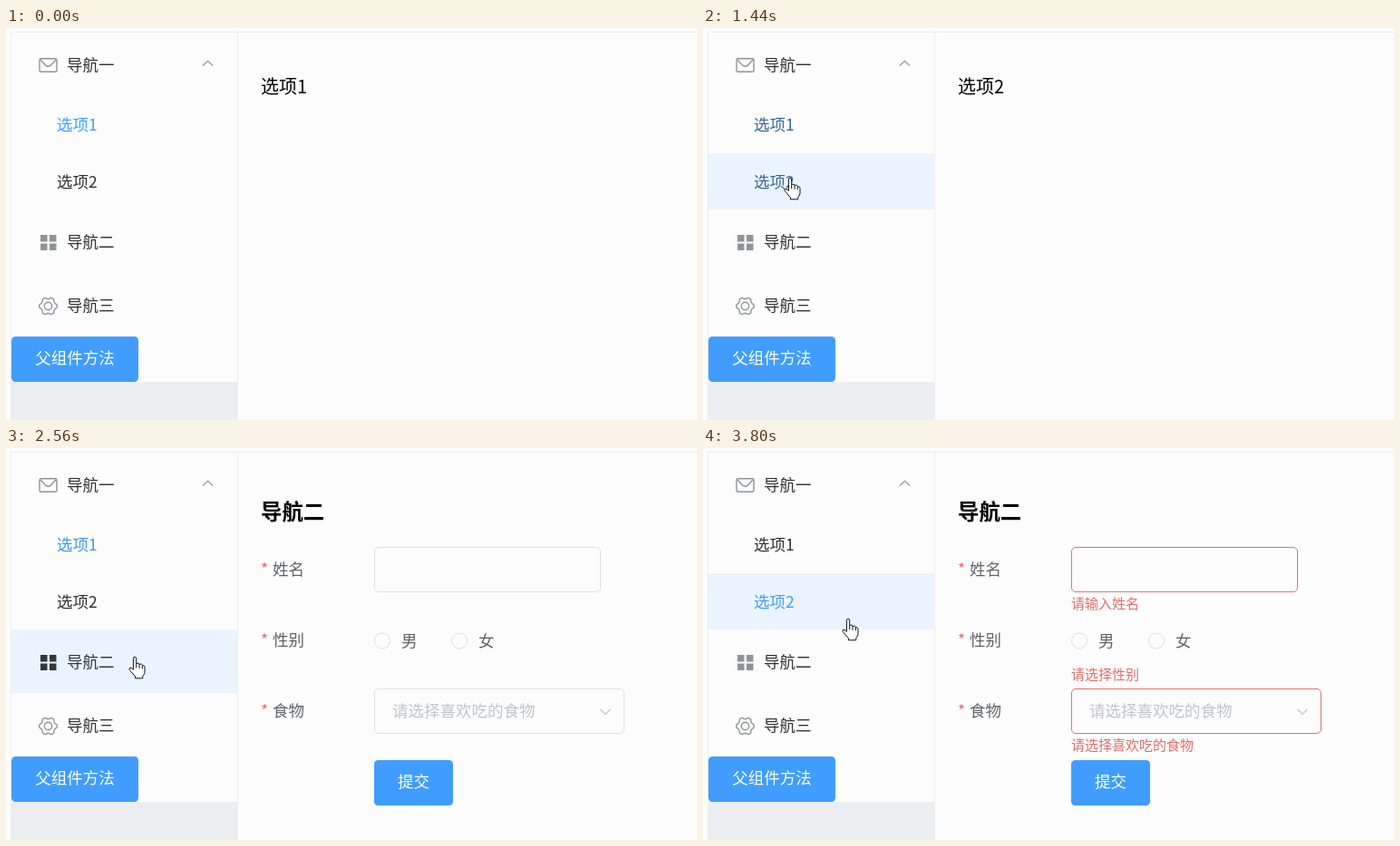
Animation of 762 by 432 pixels, one loop 3840 ms. Source, as an HTML page:

```html
<!DOCTYPE html>
<html lang="zh-CN">
<head>
<meta charset="utf-8">
<style>
html, body { margin: 0; width: 100%; height: 100%; overflow: hidden; background: #fdfdfd; }
svg { display: block; }
text { font: 17.5px "Noto Sans CJK SC", "Noto Sans CJK", sans-serif; fill: #303133; }
.icon { fill: none; stroke: #909399; stroke-width: 1.4; }
.rule { fill: none; stroke: #eeeeee; }
.button { fill: #409dff; }
.light { fill: #fff; }
.field { fill: none; stroke: #dcdfe6; }
.label { fill: #606266; }
.star { fill: #e56a6a; }
.hint { fill: #c0c4cc; }
.error { font-size: 15px; fill: #e56a6a; }
</style>
</head>
<body>
<svg width="762" height="432" viewBox="0 0 762 432">
  <rect x="5" y="390" width="251" height="42" fill="#eaeef1"/>
  <path class="rule" d="M5.5 432V4.5H762"/>
  <path class="rule" stroke="#e6e6e6" d="M255.5 5V390"/>
  <g id="bands"></g>

  <g class="icon">
    <rect x="37" y="33.7" width="19" height="14.6" rx="1.5"/>
    <path d="M38 35l5.5 6q3 2.6 6 0l5.5-6"/>
    <path d="M217 41.5l5.5-5.2 5.5 5.2" stroke-width="1.1"/>
    <path id="gear"/>
    <circle cx="46.5" cy="306.5" r="4.2"/>
  </g>
  <path id="grid" d="M38 228h7.5v7.5h-7.5zM48 228h7.5v7.5h-7.5zM38 237.5h7.5v7.5h-7.5zM48 237.5h7.5v7.5h-7.5z"/>
  <text x="67" y="47">导航一</text>
  <text id="option1" x="56" y="113.3">选项1</text>
  <text id="option2" x="56" y="176.3">选项2</text>
  <text id="nav2" x="67" y="242.3">导航二</text>
  <text x="67" y="312.3">导航三</text>
  <rect class="button" x="6" y="340" width="140" height="50" rx="4.5"/>
  <text class="light" x="32.2" y="370">父组件方法</text>

  <text id="page" x="281" y="71.5" style="font-size:20px;fill:#000"></text>
  <g id="form">
    <text x="281" y="79.3" style="font-size:23.4px;font-weight:700;fill:#000">导航二</text>
    <g id="labels"></g>
    <rect class="field check" x="406.5" y="109.5" width="249" height="49" rx="4.5"/>
    <circle class="field" cx="415" cy="212.5" r="8.5"/>
    <circle class="field" cx="500" cy="212.5" r="8.5"/>
    <text class="label" x="436" y="218.5">男</text>
    <text class="label" x="521" y="218.5">女</text>
    <rect class="field check" x="406.5" y="265.5" width="275" height="49" rx="4.5"/>
    <text class="hint" x="426" y="296.3">请选择喜欢吃的食物</text>
    <path d="M655.5 288l5.5 5.5 5.5-5.5" fill="none" stroke="#c0c4cc" stroke-width="1.2"/>
    <g id="errors"></g>
    <rect class="button" x="406" y="344" width="87" height="50" rx="4.5"/>
    <text class="light" x="432" y="374">提交</text>
  </g>

  <g id="cursor" stroke="#111" fill="#fff" stroke-linejoin="round">
    <path id="arrow" d="M0 0V16.5L3.8 13 6.4 19 9 17.8 6.4 12H11.4Z"/>
    <path id="hand" transform="translate(-1 -.7)" d="M-1.6 14V1.5Q-1.5 0 0 0T1.7 1.5V8Q2.3 6.3 4 7T5 8.5Q6 7.2 7.5 8T8.3 9.5Q11 8.6 11 12V17Q10.5 19.5 8.8 21V23.5H0.5V21.5L-6 14Q-6.3 11.5-4 11.8ZM1.7 8V12M5 8.5V12.5M8.3 9.5V13"/>
  </g>
</svg>
<script>
const LOOP = 3840, FADE = 400;
const CLICK = { option2: 1240, option1: 1740, nav2: 2540, blocked: 3320 };
const DARK = [48, 49, 51], BLUE = [64, 158, 255];
const FIELD = [220, 223, 230], ALERT = [229, 112, 112];

// Time, x, y of the pointer's hot spot
const PATH = [
  [500, 762, 345], [600, 711, 300], [800, 267, 161], [900, 267, 161],
  [1160, 97, 166], [1480, 97, 166], [1640, 110, 120], [1840, 125, 110],
  [2020, 135, 130], [2160, 145, 206], [2320, 143, 231], [2800, 143, 231],
  [2960, 155, 200], [3040, 164, 178], [3320, 161, 189], [LOOP, 161, 189]
];

// Menu rows: top, height, pairs of enter and leave times
const ROWS = [
  [75, 63, [[1580, 2035]]],
  [138, 62, [[920, 1580], [2035, 2150], [2960, 9999]]],
  [200, 70, [[2150, 2960]]]
];

const $ = id => document.getElementById(id);
const clamp = v => Math.max(0, Math.min(1, v));
const ramp = (t, start, span = FADE) => clamp((t - start) / span);
const mix = (a, b, p) => `rgb(${a.map((v, i) => Math.round(v + (b[i] - v) * p))})`;

function add(parent, tag, attrs, text = "") {
  const node = document.createElementNS("http://www.w3.org/2000/svg", tag);
  for (const key in attrs) node.setAttribute(key, attrs[key]);
  node.textContent = text;
  return $(parent).appendChild(node);
}

const bands = ROWS.map(([y, height]) =>
  add("bands", "rect", { x: 6, y, width: 249, height, fill: "#eaf4ff" }));

["姓名", "性别", "食物"].forEach((name, i) => {
  const y = 140.3 + 78 * i;
  add("labels", "text", { x: 281, y, class: "star" }, "*");
  add("labels", "text", { x: 294, y, class: "label" }, name);
});

const errors = ["请输入姓名", "请选择性别", "请选择喜欢吃的食物"].map((message, i) =>
  [164 + 78 * i, add("errors", "text", { x: 406, y: 177 + 78 * i, class: "error" }, message)]);

const gear = Array.from({ length: 72 }, (_, i) => {
  const a = i * Math.PI / 36, r = 8.9 + 0.9 * Math.tanh(2 * Math.cos(6 * a));
  return [46.5 + r * Math.cos(a), 306.5 + r * Math.sin(a)].map(v => v.toFixed(2));
});
$("gear").setAttribute("d", "M" + gear.join("L") + "Z");

function pointerAt(t) {
  const i = Math.max(1, PATH.findIndex(p => p[0] > t));
  const [t0, x0, y0] = PATH[i - 1], [t1, x1, y1] = PATH[i];
  const p = ramp(t, t0, t1 - t0);
  return [x0 + (x1 - x0) * p, y0 + (y1 - y0) * p];
}

function draw(t) {
  const { option1, option2, nav2, blocked } = CLICK;
  const since = start => ramp(t, start);

  // Hover appears quickly and lingers after the pointer leaves
  ROWS.forEach(([, , spans], i) => {
    const level = spans.reduce((sum, [on, off]) =>
      sum + 1 - (1 - since(on)) ** 2 - since(off) ** 2, 0);
    bands[i].style.opacity = clamp(level);
  });

  const active = {
    option1: 1 - since(option2) + since(option1) - since(nav2),
    option2: since(option2) - since(option1) + since(blocked),
    nav2: since(nav2) - since(blocked)
  };
  for (const id in active) $(id).style.fill = mix(DARK, BLUE, active[id]);
  $("grid").style.fill = t >= nav2 && t < blocked ? $("nav2").style.fill : "#909399";

  const onForm = t >= nav2;
  $("form").style.display = onForm ? "" : "none";
  $("page").textContent = onForm ? "" : t >= option2 && t < option1 ? "选项2" : "选项1";

  document.querySelectorAll(".check").forEach(field => {
    field.style.stroke = mix(FIELD, ALERT, ramp(t, blocked + 40, 200));
  });
  const shown = ramp(t, blocked + 40, 300);
  errors.forEach(([top, node]) => {
    node.style.opacity = shown;
    node.setAttribute("transform", `translate(0 ${top}) scale(1 ${shown}) translate(0 ${-top})`);
  });

  const [x, y] = pointerAt(t);
  $("cursor").style.display = t < PATH[0][0] ? "none" : "";
  $("cursor").setAttribute("transform", `translate(${x.toFixed(1)} ${y.toFixed(1)})`);
  $("arrow").style.display = x < 255 ? "none" : "";
  $("hand").style.display = x < 255 ? "" : "none";
}

const begin = performance.now();
function tick() {
  draw((performance.now() - begin) % LOOP);
  requestAnimationFrame(tick);
}
tick();
</script>
</body>
</html>
```
